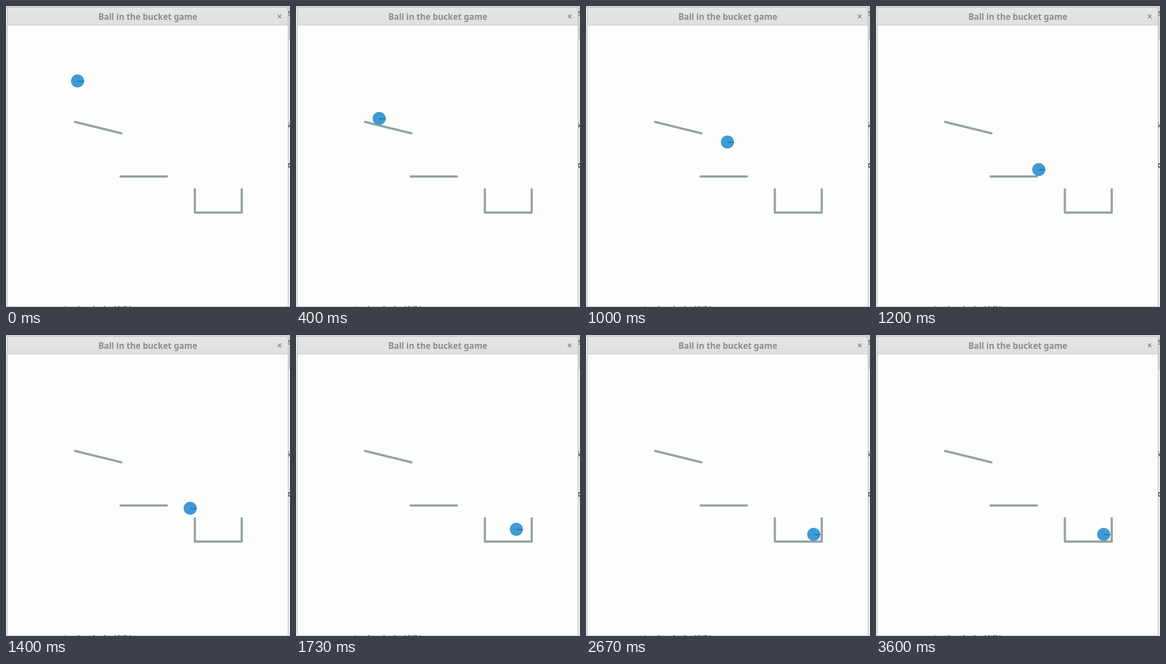
Write an HTML page that moves like this. It is 512 px wide and 542 px high and loops after 3.99 s.

```html
<!DOCTYPE html>
<html lang="en">
<head>
<meta charset="utf-8">
<title>Ball in the bucket game</title>
<style>
html, body { margin: 0; width: 100%; height: 100%; overflow: hidden; background: #fdfdfc; }
svg { display: block; width: 512px; height: 542px; }
.title { font: bold 15.1px "Noto Sans", "Open Sans", sans-serif; fill: #8c8c88; }
.page { font: 15px "Noto Sans", "Open Sans", sans-serif; fill: #484850; }
.code { font: 15px "DejaVu Sans Mono", monospace; fill: #55555a; }
.walls { fill: none; stroke: #95a4a1; stroke-width: 4; stroke-linecap: round; stroke-linejoin: round; }
</style>
</head>
<body>
<svg viewBox="0 0 512 542">
  <defs>
    <linearGradient id="bar" x2="0" y2="1">
      <stop stop-color="#e6e6e8"/>
      <stop offset="1" stop-color="#dfdfe1"/>
    </linearGradient>
  </defs>

  <!-- page behind the window -->
  <path fill="#d3d3d6" d="M0 0H512V62H508V4H0Z"/>
  <path fill="#e8e8ea" d="M0 4H3V542H0ZM508 62H512V542H508Z"/>
  <g class="page">
    <text x="508" y="17">s</text>
    <text x="507" y="220">k</text>
    <text x="507" y="291" font-weight="bold">d</text>
  </g>

  <!-- window -->
  <path fill="#fdfdfc" d="M3 34H508V541H3Z"/>
  <path fill="url(#bar)" d="M2.5 35V8Q2.5 2.5 8 2.5H503Q508.5 2.5 508.5 8V35Z"/>
  <path fill="none" stroke="#bdbdc4" d="M2.5 541V8Q2.5 2.5 8 2.5H503Q508.5 2.5 508.5 8V541"/>
  <path stroke="#cbcbcb" d="M3 34.5H508"/>
  <path stroke="#b9b9c2" d="M2 541.5H509"/>
  <text class="title" x="255.7" y="24.5" text-anchor="middle">Ball in the bucket game</text>
  <path stroke="#858585" stroke-width="1.6" d="M490 15.5L496.5 22M496.5 15.5L490 22"/>
  <svg y="540" width="512" height="2" viewBox="0 540 512 2">
    <text class="code" x="102" y="551">in bucket (50)</text>
  </svg>

  <path class="walls" d="M206.5 307H290M340.5 330V372H425V330"/>
  <path class="walls" stroke-width="3.5" d="M124.500 208.700L208 229.200"/>
  <g id="ball">
    <circle r="11.8" fill="#3f9ad6"/>
    <path stroke="#2a6796" stroke-width="1.5" d="M0 .5H12"/>
  </g>
</svg>
<script>
const LOOP = 3990, G = 900;
const ball = document.getElementById("ball");
const fall = (y, v, t) => y + v * t + G / 2 * t * t;

// Ball centre after t seconds
function place(t) {
  if (t < 0.186) return [129, fall(135, 251, t)];
  if (t < 0.785) {                                   // slide down the plank
    const d = t - 0.4, x = 150 + 120.6 * d + 105 * d * d;
    return [x, 202.5 + 0.2485 * (x - 150)];
  }
  if (t < 1) return [212 + 200 * (t - 0.785), fall(217.9, 30, t - 0.785)];
  if (t < 1.4) {                                     // land on the shelf, run off its end
    const y = t < 1.203 ? Math.min(294.5, fall(245, 223, t - 1)) : fall(294.5, 0, t - 1.203);
    return [255 + 192.5 * (t - 1), y];
  }
  if (t < 1.455) return [332 + 209 * (t - 1.4), Math.min(315, 312 + 177 * (t - 1.4))];
  return [                                           // clear the rim, drop into the bucket
    Math.min(410.5, 343.5 + 193 * (t - 1.455)),
    Math.min(359, fall(315, 0, t - 1.455))
  ];
}

// The picture advances 15 times a second, on times rounded to 10 ms
function stepAt(ms) {
  const n = Math.round(ms * 0.015);
  return Math.round(n * 20 / 3) * 10 > ms ? n - 1 : n;
}

const start = performance.now();
function draw() {
  const ms = (performance.now() - start) % LOOP;
  const [x, y] = place(stepAt(ms) / 15);
  ball.setAttribute("transform", `translate(${x.toFixed(2)} ${y.toFixed(2)})`);
  requestAnimationFrame(draw);
}
draw();
</script>
</body>
</html>
```
